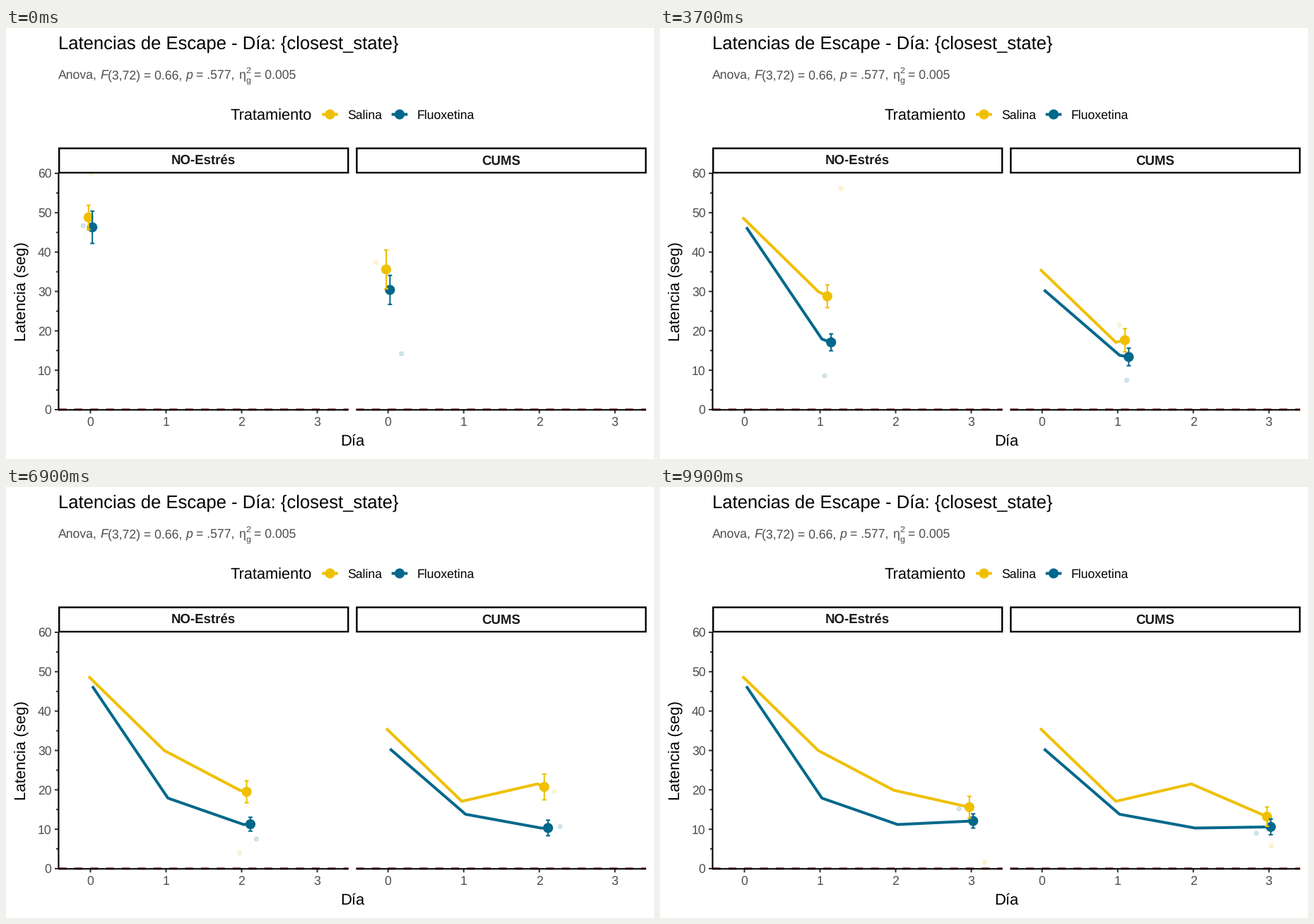
These frames come from a looping animation (917 px wide and 611 px high, 10 s). A matplotlib script:

```python
import numpy as np
import matplotlib.pyplot as plt
from matplotlib.animation import FuncAnimation
from matplotlib.colors import to_rgba
from matplotlib.patches import Circle, Rectangle

W, H, DPI = 917, 611, 64
PT = 72 / DPI                      # points per pixel
FRAMES, PER_DAY = 100, 33
GOLD, BLUE, GREY = "#EFC000", "#00688B", "#4D4D4D"
TOP, BOTTOM, DAY_W = 206, 541, 107
PANEL_W, PANEL_STEP = 410.2, 421.2
NAMES = ["NO-Estrés", "CUMS"]
DAYS = np.arange(4)

plt.rcParams.update({"font.family": "Liberation Sans", "text.hinting": "none"})

fig = plt.figure(figsize=(W / DPI, H / DPI), dpi=DPI, facecolor="white")
ax = fig.add_axes([0, 0, 1, 1])
ax.set_xlim(0, W)
ax.set_ylim(H, 0)
ax.axis("off")


def left(panel):
    return 74.4 + PANEL_STEP * panel


def px(panel, day):
    return left(panel) + 45.1 + DAY_W * np.asarray(day)


def py(value):
    return BOTTOM - (BOTTOM - TOP) / 60 * np.asarray(value)


def text(x, y, s, size, color="black", ha="left", **kw):
    return ax.text(x, y, s, fontsize=size * PT, color=color, ha=ha,
                   va="baseline", **kw)


def line(xs, ys, color="black", width=2.1, **kw):
    return ax.plot(xs, ys, color=color, lw=width * PT, snap=False,
                   solid_capstyle="butt", **kw)[0]


def dot(x, y, color, z, r=7.1, **kw):
    return ax.add_patch(Circle((x, y), r, fc=color, zorder=z, **kw))


def draw_titles():
    text(74, 30, "Latencias de Escape - Día: {closest_state}", 25.6)
    size = 17.6
    for x, s, style in [(74, "Anova,", "normal"), (133.4, "F", "italic"),
                        (144.3, "(3,72) = 0.66,", "normal"),
                        (254.4, "p", "italic"), (269, "= .577,", "normal"),
                        (329, "η", "normal"), (351, "= 0.005", "normal")]:
        text(x, 72, s, size, GREY, style=style)
    text(339.5, 64, "2", size * 0.7, GREY)
    text(339.5, 77.5, "g", size * 0.7, GREY)

    text(317.5, 131, "Tratamiento", 21.7)
    for x, color, name in [(458.5, GOLD, "Salina"), (557, BLUE, "Fluoxetina")]:
        line([x - 11.3, x + 11.3], [122.5] * 2, color, 4)
        dot(x, 122.5, color, 3)
        text(x + 24.3, 129, name, 17.6)

    text(490.5, 592, "Día", 22, ha="center")
    text(28, 374, "Latencia (seg)", 22.2, ha="center", rotation=90,
         rotation_mode="anchor")


def draw_panels():
    for i, name in enumerate(NAMES):
        x0, x1 = left(i), left(i) + PANEL_W
        ax.add_patch(Rectangle((x0 + 0.8, 170.6), PANEL_W - 1.2, 34.5,
                               fc="white", ec="black", lw=2.4 * PT, zorder=9,
                               snap=False))
        text((x0 + x1) / 2 + 0.2, 194, name, 18.6, "#1A1A1A", "center",
             weight="bold", zorder=10)
        line([x0, x1], [BOTTOM - 0.1] * 2, "#8B0000", 2.8, zorder=1,
             dashes=(4, 4), dash_capstyle="butt")
        line([x0, x1], [BOTTOM + 0.3] * 2, zorder=8)
        for day in DAYS:
            line([px(i, day)] * 2, [BOTTOM, BOTTOM + 5.4], "#333333", 2)
            text(px(i, day), 564.3, str(day), 17.6, GREY, "center")

    line([left(0)] * 2, [TOP, BOTTOM + 1.3], zorder=8)
    for v in range(0, 61, 5):
        major = v % 10 == 0
        line([69 if major else 71, 74], [py(v)] * 2, "#333333", 2)
        if major:
            text(64.5, py(v) + 6.3, str(v), 17.6, GREY, "right")


class Track:
    """Growing mean line with its marker, error bar and one drifting sample."""

    def __init__(self, panel, color, seed, mean, spread, starts, ends):
        self.panel, self.mean, self.spread = panel, mean, spread
        self.dodge = -0.025 if color == GOLD else 0.025
        self.starts, self.ends = starts, [*ends, starts[-1]]
        rng = np.random.default_rng(seed)
        self.jitter = rng.uniform(-0.2, 0.2, (2, len(DAYS)))

        top = 0.1 if color == BLUE else 0
        self.sample = dot(0, 0, to_rgba(color, 0.17), 2 + top, 3,
                          ec=to_rgba(color, 0.15), lw=1.1 * PT)
        self.sample.set_clip_path(
            Rectangle((left(panel), TOP), PANEL_W, BOTTOM - TOP,
                      transform=ax.transData))
        self.path = line([], [], color, 4, zorder=3 + top,
                         solid_joinstyle="round")
        self.head = dot(0, 0, color, 4 + top)
        self.bar = line([], [], color, 2, zorder=5 + top)

    def update(self, frame):
        now = frame / PER_DAY
        day, step = divmod(frame, PER_DAY)
        t = step / PER_DAY
        m = np.interp(now, DAYS, self.mean)
        # standard error grows linearly with the mean
        base, slope = self.spread
        e = base + slope * m

        xs = np.append(DAYS[:day + 1], now) + self.dodge
        self.path.set_data(px(self.panel, xs), py([*self.mean[:day + 1], m]))

        x, gap = px(self.panel, now + self.dodge), np.nan
        self.head.center = x, py(m)
        hi, lo = py(m + e), py(m - e)
        self.bar.set_data([x - 3, x + 3, gap, x, x, gap, x - 3, x + 3],
                          [hi, hi, gap, hi, lo, gap, lo, lo])

        # the sample leaves from one animal and arrives at another
        shift = (1 - t) * self.jitter[0, day] + t * self.jitter[1, day]
        value = (1 - t) * self.starts[day] + t * self.ends[day]
        self.sample.center = px(self.panel, now + shift), py(value)


draw_titles()
draw_panels()
# panel, colour, seed, daily means, error rule, sample starts and ends by day
tracks = [
    Track(0, GOLD, 1, [48.8, 30, 19.9, 15.6], (2.6, 0.01),
          [60, 60, 4, 1.6], [57.4, 27.9, 3.7]),
    Track(0, BLUE, 2, [46.3, 17.9, 11.2, 12.1], (1, 0.067),
          [46.7, 6, 7.5, 15.2], [5.3, 27.3, 7.5]),
    Track(1, GOLD, 3, [35.6, 17.1, 21.5, 13.2], (1, 0.11),
          [37.4, 21.6, 20, 5.8], [36.9, 20.8, 15.2]),
    Track(1, BLUE, 4, [30.4, 13.8, 10.3, 10.6], (1.1, 0.085),
          [14.2, 6, 10.7, 9], [21, 17.9, 10.7]),
]


def update(frame):
    for track in tracks:
        track.update(frame)
    return []


anim = FuncAnimation(fig, update, frames=FRAMES, interval=1000 / 10,
                     repeat=True, repeat_delay=0, blit=False)
plt.show()
```
